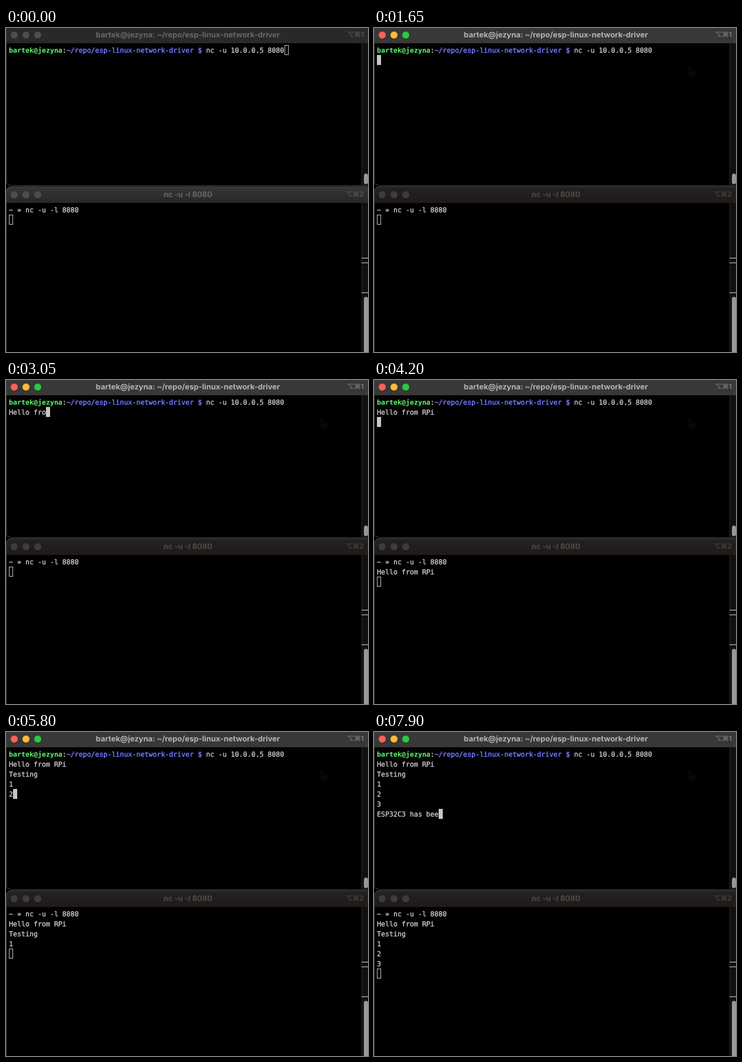
Recreate the animation shown at these times as an HTML page. Size 616x552 px, loop 8000 ms.

```html
<!DOCTYPE html>
<html lang="en">
<head>
<meta charset="utf-8">
<title>UDP between two terminals</title>
<style>
  html, body { margin: 0; width: 100%; height: 100%; overflow: hidden; background: #000; }
  svg { display: block; width: 616px; height: 552px; }
  text { white-space: pre; text-rendering: geometricPrecision; }
  .mono {
    font: 11.627px "DejaVu Sans Mono", "Liberation Mono", monospace;
    fill: #d2d2d2; stroke: #d2d2d2; stroke-width: .3px;
  }
  .user { font-weight: 700; fill: #5ffa68; stroke: none; }
  .path { fill: #6f76ff; stroke: #6f76ff; stroke-width: .5px; }
  .title { font: 700 13px Inter, "Liberation Sans", sans-serif; text-anchor: middle; }
  .hint { font: 700 12px Inter, "DejaVu Sans", sans-serif; text-anchor: end; }
</style>
</head>
<body>
<svg id="stage" viewBox="0 0 616 552">
  <defs>
    <linearGradient id="lowerBar" x1="0" y1="0" x2="0" y2="1">
      <stop id="barTop" offset="0"/>
      <stop id="barEnd" offset="1"/>
    </linearGradient>
  </defs>
  <rect width="616" height="552" fill="#000"/>
</svg>
<script>
const LOOP = 8000, CELL = 7, ROW = 17, LEFT = 5;
const FOCUS = 950, ENTER = 1500;
const PROMPT = "bartek@jezyna", PATH = "~/repo/esp-linux-network-driver $";
const COMMAND = " nc -u 10.0.0.5 8080";

// Each entry: the characters typed, then the time of every key press.
const typing = [
  ["Hello ", 1900, 2100, 2250, 2350, 2500, 2650],
  ["from ", 2950, 3000, 3050, 3150, 3200],
  ["RPi\n", 3350, 3450, 3600, 3800],
  ["Testing\n", 4400, 4500, 4550, 4700, 4750, 4800, 4850, 4950],
  ["1\n2\n3\n", 5250, 5500, 5750, 5850, 5950, 6050],
  ["ESP32C3 ", 6350, 6500, 6550, 6750, 6750, 7000, 7200, 7300],
  ["has bee", 7500, 7550, 7650, 7700, 7750, 7850, 7900]
];
const keys = typing.flatMap(([text, ...times]) => times.map((at, i) => ({ at, key: text[i] })));
const echoes = [4200, 5050, 5600, 5900, 6100];

const stage = document.getElementById("stage");
const clamp = v => Math.min(1, Math.max(0, v));
const ramp = (t, a, b) => clamp((t - a) / (b - a));

function add(tag, attrs, text = "", parent = stage) {
  const el = document.createElementNS("http://www.w3.org/2000/svg", tag);
  set(el, attrs);
  if (text) el.textContent = text;
  parent.append(el);
  return el;
}

function set(el, attrs) {
  for (const name in attrs) el.setAttribute(name, attrs[name]);
}

function mix(a, b, k) {
  return `rgb(${a.map((v, i) => Math.round(v + (b[i] - v) * k))})`;
}

// Window frames and title bars
const upperBar = add("rect", { width: 616, height: 26 });
add("path", { d: "M.5 0V259.500Q.5 268.500 9.500 268.500H616", fill: "none", stroke: "#484848" });
add("path", { d: "M0 298V280Q0 270 10 270H616V298Z", fill: "url(#lowerBar)" });
add("path", { d: "M.5 552V279.500Q.5 270.500 9.500 270.500H616", fill: "none", stroke: "#484848" });

function header(y, title, hint) {
  const lights = [14, 34, 54].map(cx => add("circle", { cx, cy: y, r: 6 }));
  const texts = [
    add("text", { class: "title", x: 309.5, y: y + 4 }, title),
    add("text", { class: "hint", x: 609, y: y + 3 }, hint)
  ];
  return { lights, texts };
}
const upper = header(12, `${PROMPT}: ~/repo/esp-linux-network-driver`, "⌥⌘1");
const lower = header(284, "nc -u -l 8080", "⌥⌘2");

// Scroll bars
for (const [y, height] of [[26, 242], [298, 254]]) {
  add("rect", { x: 605, y, width: 11, height, fill: "#101010" });
  add("rect", { x: 605, y, width: 1, height, fill: "#2b2b2b" });
}
for (const y of [391, 399, 450]) {
  add("rect", { x: 605, y, width: 11, height: 2, fill: "#7c7c7c" });
}
add("rect", { x: 609, y: 248, width: 7, height: 18, rx: 3.5, fill: "#989898" });
add("rect", { x: 609, y: 458, width: 7, height: 100, rx: 3.5, fill: "#989898" });

// Terminal contents
function line(top, row) {
  return add("text", { class: "mono", x: LEFT, y: top + row * ROW + 13 });
}
const command = line(29, 0);
add("tspan", { class: "user" }, PROMPT, command);
add("tspan", {}, ":", command);
add("tspan", { class: "path" }, PATH, command);
add("tspan", {}, COMMAND, command);
line(301, 0).textContent = "~ » nc -u -l 8080";

const typed = [1, 2, 3, 4, 5, 6].map(row => line(29, row));
const received = [1, 2, 3, 4, 5].map(row => line(301, row));
const cursor = add("rect", { stroke: "#c7c7c7" });
const lowerCursor = add("rect", { x: 5.5, width: 6, height: 16, fill: "none", stroke: "#c7c7c7" });

const pointer = add("path", {
  d: "M0 0V14L3 11L5.500 16.500L8 15.500L5.500 10H10Z", fill: "#000", stroke: "#fff"
});

function drawCursor(t, lines) {
  const entered = t >= ENTER;
  const row = entered ? lines.length : 0;
  const column = entered ? lines.at(-1).length : (PROMPT + ":" + PATH + COMMAND).length;
  set(cursor, {
    x: LEFT + column * CELL + 0.5, y: 29 + row * ROW + 0.5, width: CELL - 1, height: ROW - 1,
    fill: t >= FOCUS ? "#c7c7c7" : "none"
  });
}

function drawChrome(t) {
  const on = ramp(t, FOCUS, FOCUS + 150);
  const dim = ramp(t, FOCUS, 1650);
  const idle = [77, 77, 77];
  const colours = [[255, 95, 87], [254, 188, 46], [40, 200, 64]];

  set(upperBar, { fill: mix([42, 41, 40], [56, 56, 56], on) });
  upper.lights.forEach((el, i) => set(el, { fill: mix(idle, colours[i], on) }));
  set(upper.texts[0], { fill: mix([104, 103, 102], [180, 180, 180], on) });
  set(upper.texts[1], { fill: mix([82, 81, 80], [120, 120, 120], on) });

  set(document.getElementById("barTop"), { "stop-color": mix([56, 53, 51], [36, 34, 33], dim) });
  set(document.getElementById("barEnd"), { "stop-color": mix([42, 40, 39], [30, 27, 25], dim) });
  lower.lights.forEach(el => set(el, { fill: mix(idle, [62, 60, 58], dim) }));
  set(lower.texts[0], { fill: mix([104, 103, 102], [76, 73, 70], dim) });
  set(lower.texts[1], { fill: mix([82, 81, 80], [66, 63, 61], dim) });
}

function drawPointer(t) {
  const left = 1 - ramp(t, 500, 900);
  const away = left ** 3;
  set(pointer, {
    transform: `translate(${536.5 + 84 * away} ${65.5 + 130 * away})`,
    opacity: t < 500 ? 0 : 1 - 0.91 * ramp(t, 1400, 1650)
  });
}

function render(t) {
  const lines = keys.filter(k => k.at <= t).map(k => k.key).join("").split("\n");
  const count = echoes.filter(at => at <= t).length;
  typed.forEach((el, i) => { el.textContent = lines[i] || ""; });
  received.forEach((el, i) => { el.textContent = i < count ? lines[i] : ""; });
  set(lowerCursor, { y: 318.5 + count * ROW });
  drawCursor(t, lines);
  drawChrome(t);
  drawPointer(t);
}

const start = performance.now();
function tick() {
  render((performance.now() - start) % LOOP);
  requestAnimationFrame(tick);
}
tick();
</script>
</body>
</html>
```
